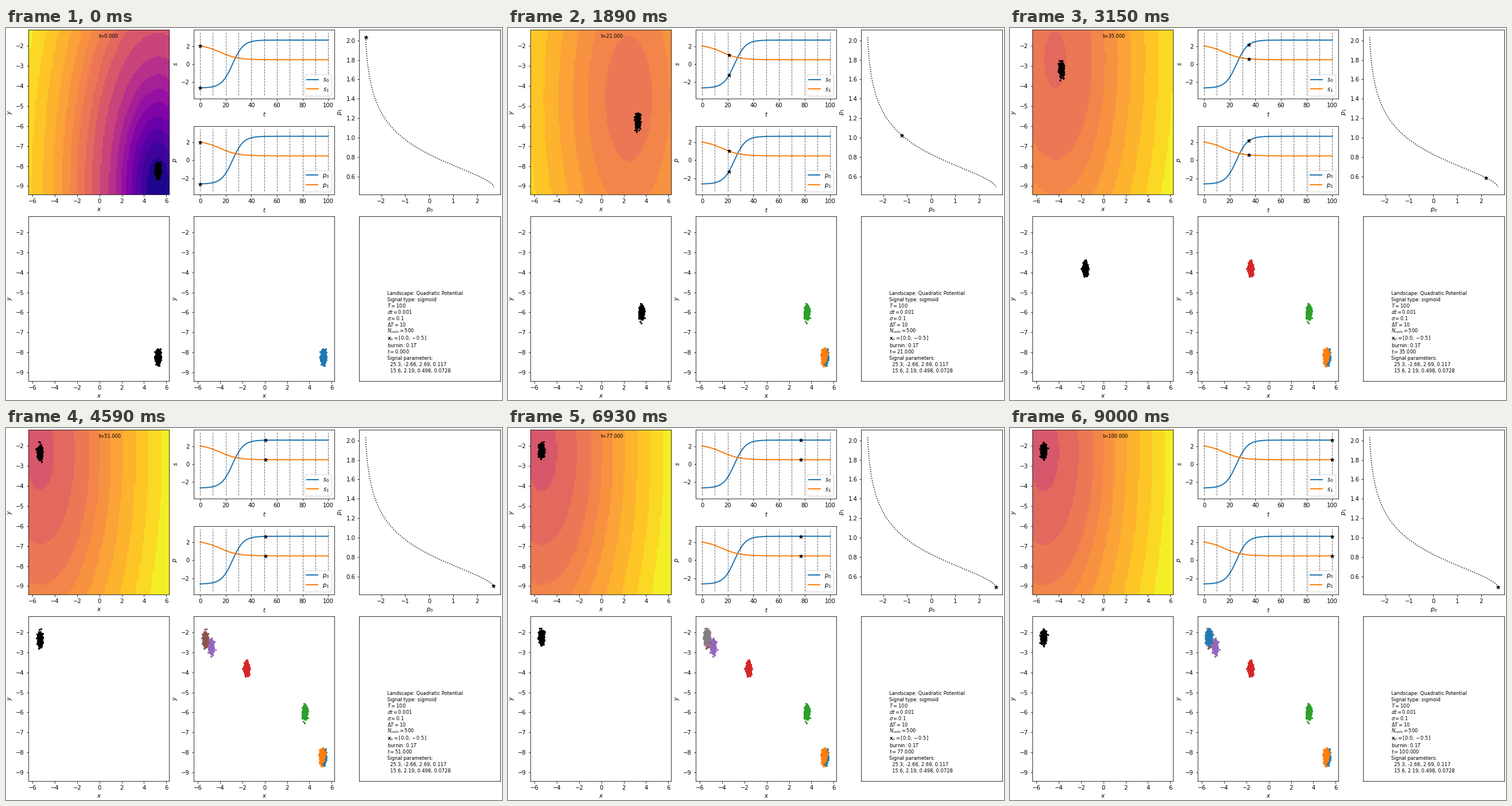
Write a matplotlib script that moves like this. It is 864 by 648 pixels and loops after 9090 ms.

```python
import numpy as np
import matplotlib.pyplot as plt
from matplotlib.animation import FuncAnimation
from matplotlib.colors import BoundaryNorm, ListedColormap

W, H, DPI = 864, 648, 72
T, STEP, N_CELLS, SIGMA = 100, 10, 500, 0.1
XLIM, YLIM = (-6.36, 6.26), (-9.41, -1.2)
STIFF = np.array([1 / 2, 2 / 9])
SIGMOIDS = [(25.3, -2.66, 2.69, 0.117), (15.6, 2.19, 0.498, 0.0728)]


def signal(t):
    """Both sigmoid signals at time t, stacked on the last axis."""
    t = np.asarray(t, float)
    return np.stack([a + (b - a) / 2 * (1 + np.tanh(r * (t - tc)))
                     for tc, a, b, r in SIGMOIDS], axis=-1)


def mean_path(substeps=100):
    """Mean cell position at every whole time, after the burn-in."""
    dt = 1 / substeps
    target = -signal(0) / STIFF
    pos = target + (np.array([0, -0.5]) - target) * np.exp(-STIFF * 0.1 * T)
    path = [pos]
    for t in range(T):
        for i in range(substeps):
            pos = pos - dt * (STIFF * pos + signal(t + (i + 0.5) * dt))
        path.append(pos)
    return np.array(path)


def cell_noise(rng):
    """Stationary Ornstein-Uhlenbeck scatter around the mean."""
    std = SIGMA / np.sqrt(2 * STIFF)
    keep = np.exp(-STIFF)
    noise = [rng.normal(size=(N_CELLS, 2)) * std]
    for _ in range(T):
        kick = rng.normal(size=(N_CELLS, 2)) * std * np.sqrt(1 - keep**2)
        noise.append(noise[-1] * keep + kick)
    return np.array(noise)


cells = mean_path()[:, None, :] + cell_noise(np.random.default_rng(4))
params = signal(np.arange(T + 1))
fine = np.linspace(0, T, 1001)

# Landscape on a grid, log-scaled over the whole run
gx, gy = np.meshgrid(np.linspace(*XLIM, 100), np.linspace(*YLIM, 100))
phi = (gx**2 / 4 + gy**2 / 9 + params[:, 0, None, None] * gx
       + params[:, 1, None, None] * gy)
heat = np.log1p(phi - phi.min())
heat /= heat.max()

edges = np.array([0, .06, .12, .176, .23, .289, .34, .394, .455, .527, .59,
                  .637, .687, .725, .766, .81, .857, .902, .945, 1.001])
bands = ListedColormap(plt.cm.plasma((edges[:-1] + edges[1:]) / 2))

fig = plt.figure(figsize=(W / DPI, H / DPI), dpi=DPI)

# Panel edges in pixels from the top left
COLS, COL_W = (39, 327, 615.4), 245.4
UPPER, LOWER = (3, 289.8), (327.8, 614.6)


def panel(col, rows, xlabel="", ylabel=""):
    top, bottom = rows
    ax = fig.add_axes([COLS[col] / W, 1 - bottom / H,
                       COL_W / W, (bottom - top) / H])
    ax.set_xlabel(xlabel)
    ax.set_ylabel(ylabel)
    return ax


def space_panel(col, rows):
    ax = panel(col, rows, "$x$", "$y$")
    ax.set(xlim=XLIM, ylim=YLIM, xticks=range(-6, 7, 2),
           yticks=range(-9, -1))
    return ax


def dots(ax, color):
    return ax.plot([], [], ".", color=color, ms=4.5)[0]


def star(ax):
    return ax.plot([], [], "k*", ms=6.5, zorder=5)[0]


def signal_panel(rows, name):
    ax = panel(1, rows, "$t$", f"${name}$")
    for i, curve in enumerate(signal(fine).T):
        ax.plot(fine, curve, lw=2, label=f"${name}_{i}$")
    ax.vlines(range(0, T + 1, STEP), -3.47, 3.5, colors="k",
              linestyles="--", lw=1, alpha=0.55)
    ax.set(xlim=(-5, 105), ylim=(-3.82, 3.85), xticks=range(0, 101, 20),
           yticks=(-2, 0, 2))
    ax.legend(loc="lower right")
    return [star(ax), star(ax)]


land = space_panel(0, UPPER)
image = land.imshow(heat[0], cmap=bands, norm=BoundaryNorm(edges, bands.N),
                    extent=(*XLIM, *YLIM), origin="lower", aspect="auto",
                    interpolation="nearest")
live = dots(land, "k")
clock = land.text(0.5, 0.95, "", fontsize="small", transform=land.transAxes)

signal_stars = (signal_panel((3, 122.6), "s")
                + signal_panel((170.6, 289.8), "p"))

phase = panel(2, UPPER, "$p_0$", "$p_1$")
phase.plot(*signal(fine).T, "k:")
phase_star = star(phase)
phase.set(xlim=(-2.912, 2.957), ylim=(0.421, 2.109))

snapshot = dots(space_panel(0, LOWER), "k")
history_ax = space_panel(1, LOWER)
history = [dots(history_ax, f"C{i % 10}") for i in range(T // STEP + 1)]

info_ax = panel(2, LOWER)
info_ax.set(xticks=[], yticks=[])
INFO = [
    "Landscape: Quadratic Potential",
    "Signal type: sigmoid",
    "$T=100$",
    "$dt=0.001$",
    r"$\sigma=0.1$",
    r"$\Delta T=10$",
    "$N_{cells}=500$",
    r"$\mathbf{x}_0=[0.0, -0.5]$",
    "burnin: $0.1T$",
    "$t=%.3f$",
    "Signal parameters:",
    "  25.3, -2.66, 2.69, 0.117",
    "  15.6, 2.19, 0.498, 0.0728",
]


def info_lines():
    """Stack the lines upwards, with more room around the vector."""
    x, y = COLS[2] + 0.2 * COL_W, 600.3
    lines = []
    for text in reversed(INFO):
        lines.append(fig.text(x / W, 1 - y / H, text, fontsize="small"))
        roomy = "burnin" in text or "mathbf" in text
        y -= 12.8 if roomy else 11
    return lines[::-1]


info_time = info_lines()[INFO.index("$t=%.3f$")]


def update(t):
    image.set_data(heat[t])
    live.set_data(*cells[t].T)
    clock.set_text(f"t={t:.3f}")
    for i, mark in enumerate(signal_stars):
        mark.set_data([t], [params[t, i % 2]])
    phase_star.set_data([params[t, 0]], [params[t, 1]])
    snapshot.set_data(*cells[t // STEP * STEP].T)
    for i, group in enumerate(history):
        group.set_data(*cells[i * STEP].T)
        group.set_visible(i * STEP <= t)
    info_time.set_text(f"$t={t:.3f}$")
    return []


anim = FuncAnimation(fig, update, frames=T + 1, interval=90, repeat=True,
                     repeat_delay=0, init_func=lambda: update(0))
plt.show()
```
